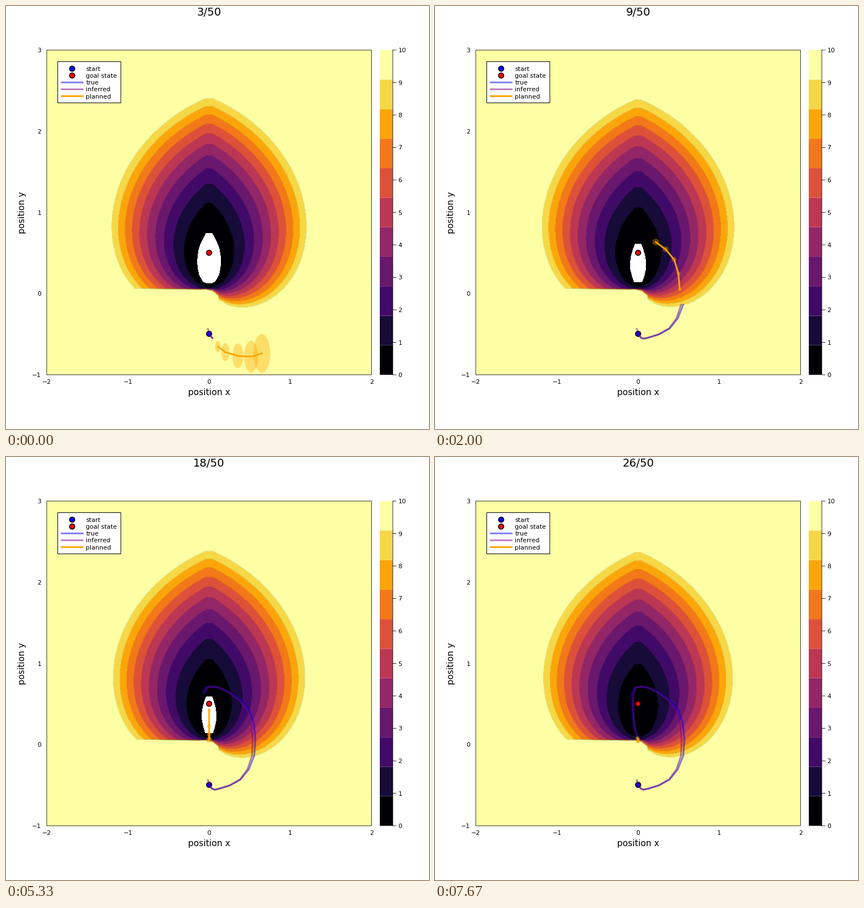
A matplotlib script for the animation above (8 s loop, 748 by 749 pixels).

```python
import numpy as np
import matplotlib.pyplot as plt
from matplotlib.animation import FuncAnimation
from matplotlib.patches import Ellipse, Rectangle

W, H = 748, 749
PT = 0.72                      # points per pixel at 100 dpi
FRAMES, LOOP_MS, FIRST_STEP = 24, 8000, 3
LEFT, RIGHT, TOP, BOTTOM = 72, 646.3, 78, 653
CX = (LEFT + RIGHT) / 2
COLORS = [plt.get_cmap("inferno")(i / 10) for i in range(11)]
LAST_NEGATIVE_STEP = 19        # afterwards the cost stays above zero
HORIZON = np.arange(1, 6)

# Key points of the driven path: step, x, y in pixels
KEYS = np.array([
    (1, 359, 580), (3, 365, 588), (5, 378, 587), (7, 415, 571), (9, 439, 529),
    (10, 441, 500), (12, 430, 447), (14, 394, 416), (16, 364, 406.5),
    (18, 348, 418), (20, 352, 475), (22, 359, 499)], float)

# Range and bearing seen from the origin, on a coarse grid
GX, GY = np.meshgrid(np.linspace(-2, 2, 50), np.linspace(-1, 3, 50))
RANGE = np.hypot(GX, GY)
BEARING = np.abs(np.arctan2(GY, GX) - np.pi / 2)
REACH = RANGE + BEARING + 0.003 / RANGE**2
PX = LEFT + (GX + 2) / 4 * (RIGHT - LEFT)
PY = BOTTOM - (GY + 1) / 4 * (BOTTOM - TOP)

plt.rcParams["font.family"] = "DejaVu Sans"
fig = plt.figure(figsize=(W / 100, H / 100), dpi=100, facecolor="white")
ax = fig.add_axes([0, 0, 1, 1])


def text(x, y, s, size, ha="center", va="baseline", **kw):
    return ax.text(x, y, s, fontsize=size * PT, ha=ha, va=va, zorder=20, **kw)


def line(xs, ys, color, width=3, **kw):
    return ax.plot(xs, ys, color=color, lw=width * PT, snap=False,
                   solid_joinstyle="round", **kw)[0]


def box(x0, y0, x1, y1, fill, edge="none", width=1, zorder=1):
    ax.add_patch(Rectangle((x0, y0), x1 - x0, y1 - y0, fc=fill, ec=edge,
                           lw=width * PT, zorder=zorder, snap=False))


def marker(x, y, color, zorder):
    ax.add_patch(Ellipse((x, y), 9.2, 9.2, fc=color, ec="black",
                         lw=1.5 * PT, zorder=zorder))


def cost(step):
    settle = 0.22 / (1 + np.exp(6.5 - step))
    late = 0.2 * (max(step - 16, 0) / 10)**2
    value = 2.604 * np.maximum(REACH - 0.43, 0)**2 - 0.388 + settle + late
    return value if step <= LAST_NEGATIVE_STEP else np.maximum(value, 1e-3)


def true_path(t):
    """Cubic Hermite curve through the key points."""
    times, points = KEYS[:, 0], KEYS[:, 1:]
    slopes = np.gradient(points, times, axis=0)
    t = np.clip(t, times[0], times[-1])
    i = np.clip(np.searchsorted(times, t, side="right") - 1, 0, len(times) - 2)
    span = (times[i + 1] - times[i])[:, None]
    u = (t - times[i])[:, None] / span
    x, y = (points[i] * (1 + 2 * u) * (1 - u)**2
            + points[i + 1] * u**2 * (3 - 2 * u)
            + slopes[i] * span * u * (1 - u)**2
            - slopes[i + 1] * span * u**2 * (1 - u)).T
    return x, y


def inferred_path(t):
    x, y = true_path(t)
    start_error = np.exp(2 - 2 * t)
    bend = 3 * np.exp(-((t - 18) / 1.5)**2) - 5 * np.exp(-((t - 10.5) / 3)**2)
    return x + bend - 2 * start_error, y - 8 * start_error


def planned_path(step, doubt):
    """The road ahead, cut slightly short and blurred while still in doubt."""
    x, y = true_path(step + HORIZON)
    x = CX + 0.9 * np.maximum(x - CX, 0) + 6 * doubt * HORIZON
    y = y + 2 + 12 * doubt * HORIZON
    arrived = step + HORIZON > 22
    return (x + arrived * 1.2 * np.sin(2 * HORIZON + step),
            y + arrived * 4 * np.sin(0.8 * HORIZON))


def draw_static():
    ax.set_xlim(0, W)
    ax.set_ylim(H, 0)
    ax.axis("off")
    box(LEFT, TOP, RIGHT, BOTTOM, "none", "black", 0.8, zorder=15)
    for i in range(5):
        text(LEFT + i * (RIGHT - LEFT) / 4, 669, f"{i - 2}".replace("-", "−"), 11)
        text(62.5, BOTTOM - i * (BOTTOM - TOP) / 4 + 4,
             f"{i - 1}".replace("-", "−"), 11, ha="right")
    text(CX, 689, "position x", 15.2)
    text(28.5, 365.5, "position y", 15.2, rotation=90, va="center")

    band = (BOTTOM - TOP) / 11
    for i, color in enumerate(COLORS):
        box(661, BOTTOM - (i + 1) * band, 684, BOTTOM - i * band, color)
        y = BOTTOM - i * (BOTTOM - TOP) / 10
        line([684, 690], [y, y], "black", 0.8)
        text(693.5, y + 4, str(i), 11, ha="left")
    line([684, 684], [TOP, BOTTOM], "black", 0.8)

    box(91.5, 98.5, 203, 171.5, "white", "black", zorder=16)
    entries = [("start", "blue", 1), ("goal state", "red", 1),
               ("true", "blue", 0.5), ("inferred", "purple", 0.5),
               ("planned", "orange", 1)]
    for i, (label, color, alpha) in enumerate(entries):
        y = 111 + 12.15 * i
        if i < 2:
            marker(117, y, color, 17)
        else:
            line([97, 137], [y, y], color, alpha=alpha, zorder=17,
                 solid_capstyle="butt")
        text(141.5, y + 4, label, 11, ha="left")
    marker(CX, 580.5, "blue", 6)
    marker(CX, 437, "red", 6)


draw_static()
title = text(CX, 17, "", 19.4)
moving = []


def update(frame):
    step = frame + FIRST_STEP
    while moving:
        moving.pop().remove()
    title.set_text(f"{step}/50")

    field = cost(step)
    moving.append(ax.contourf(PX, PY, field, levels=range(11), colors=COLORS,
                              extend="max", zorder=2))
    moving.append(ax.contour(PX, PY, field, levels=range(1, 11),
                             colors="black", alpha=0.2, linewidths=0.5 * PT,
                             zorder=3))

    steps = np.arange(1, step + 1)
    moving.append(line(*true_path(steps), "blue", alpha=0.5, zorder=7))
    moving.append(line(*inferred_path(steps), "purple", alpha=0.5, zorder=8))

    doubt = np.exp(-1.2 * (step - FIRST_STEP))
    xs, ys = planned_path(step, doubt)
    for k, x, y in zip(HORIZON, xs, ys):
        rx = (2 + 0.8 * k) * (0.6 if step + k > 22 else 1) + 1.8 * doubt * k
        ry = rx + doubt * (2 + 3.4 * k)
        moving.append(ax.add_patch(Ellipse((x, y), 2 * rx, 2 * ry, fc="orange",
                                           ec="none", alpha=0.36, zorder=9)))
    moving.append(line(xs, ys, "orange", 2.8, zorder=10))
    return moving + [title]


anim = FuncAnimation(fig, update, frames=FRAMES, interval=LOOP_MS / FRAMES,
                     repeat=True, repeat_delay=0, blit=False)
plt.show()
```
